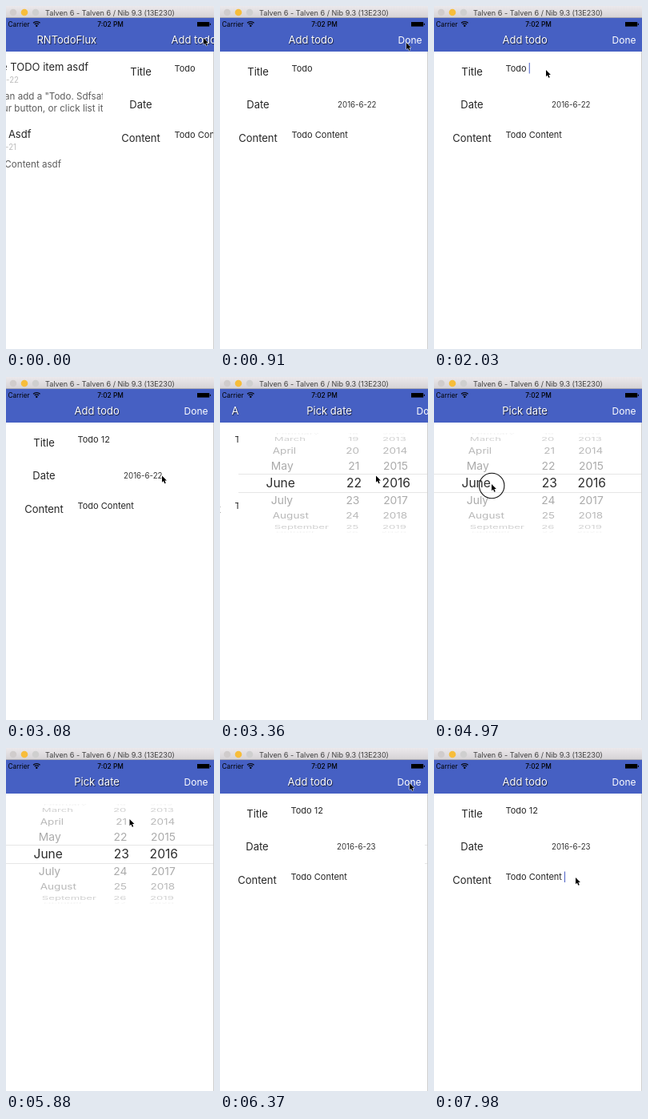
Write an HTML page with a canvas that moves like this. It is 260x429 px and loops after 8000 ms.

```html
<!DOCTYPE html>
<html lang="en">
<head>
<meta charset="utf-8">
<title>Todo app demo</title>
<style>
  html, body { margin: 0; width: 100%; height: 100%; overflow: hidden; background: #fff; }
  canvas { display: block; width: 260px; height: 429px; }
</style>
</head>
<body>
<canvas id="stage"></canvas>
<script>
const W = 260, H = 429, LOOP = 8000, TICK = 70, GLIDE = 280;
const BLUE = '#4660c3', INK = '#262626';
const canvas = document.getElementById('stage');
const ctx = canvas.getContext('2d');
const ratio = window.devicePixelRatio || 1;
canvas.width = W * ratio;
canvas.height = H * ratio;

// Where the pointer heads, when it leaves, and when it presses there
const STOPS = [
  { go: -GLIDE, x: 247, y: 40 },
  { go: 350, x: 233, y: 46 },
  { go: 1330, x: 140, y: 80, down: 1750, up: 1890 },
  { go: 2520, x: 195, y: 123.5, down: 2940, up: 3080 },
  { go: 3570, x: 181, y: 157 },
  { go: 3920, x: 154, y: 150, down: 4060, up: 4200 },
  { go: 4200, x: 154, y: 132, down: 4200, up: 4480 },
  { go: 4550, x: 72, y: 134, down: 4900, up: 5460 },
  { go: 5740, x: 237, y: 44, down: 6020, up: 6090 },
  { go: 7000, x: 165, y: 168, down: 7560, up: 7700 },
  { go: 7700, x: 177, y: 162 }
];

const clamp = (v, lo = 0, hi = 1) => Math.min(hi, Math.max(lo, v));

function ease(t, from, span = GLIDE) {
  const k = clamp((t - from) / span);
  return k * k * (3 - 2 * k);
}

// Critically damped spring, 0 to 1
function spring(ms) {
  const k = Math.max(0, ms) * 0.0145;
  return 1 - (1 + k) * Math.exp(-k);
}

function text(str, x, y, size, color = INK, align = 'left', weight = 400) {
  ctx.font = `${weight} ${size}px Inter, Arial, sans-serif`;
  ctx.textAlign = align;
  ctx.fillStyle = color;
  ctx.fillText(str, x, y);
}

function rect(x, y, w, h, color) {
  ctx.fillStyle = color;
  ctx.fillRect(x, y, w, h);
}

function circle(x, y, r, color, line) {
  ctx.beginPath();
  ctx.arc(x, y, r, 0, Math.PI * 2);
  ctx.fillStyle = ctx.strokeStyle = color;
  ctx.lineWidth = line;
  if (line) ctx.stroke();
  else ctx.fill();
}

function page(offset, title, titleX, action, body) {
  ctx.save();
  ctx.translate(Math.round(offset), 0);
  rect(0, 15, W, H - 15, '#fff');
  rect(0, 15, W, 42, BLUE);
  ctx.save();
  ctx.shadowColor = 'rgba(0,0,0,.75)';
  ctx.shadowOffsetX = ctx.shadowOffsetY = 0.8 * ratio;
  ctx.shadowBlur = ratio;
  text(title, titleX, 47.4, 13, '#fff');
  ctx.restore();
  text(action, 252.5, 47.4, 12, '#fff', 'right');
  body();
  ctx.restore();
}

function listBody() {
  const grey = '#bcbcbc', soft = '#5c5c5c';
  text('Some TODO item asdf', 145, 80.5, 13, INK, 'right');
  text('2016-6-22', 58, 96, 9.7, grey, 'right');
  text('You can add a "Todo. Sdfsaf', 165.5, 117, 11.6, soft, 'right');
  text('your button, or click list it', 163.5, 132, 11.7, soft, 'right');
  text('Todo Asdf', 73.5, 165, 13, INK, 'right');
  text('2016-6-21', 55, 180, 9.7, grey, 'right');
  text('Todo Content asdf', 111, 202, 11.6, soft, 'right');
}

function field(str, y, caret) {
  text(str, 89.5, y, 11);
  if (caret) rect(89.5 + ctx.measureText(str).width, y - 10.5, 1, 13.5, '#4a5fc4');
}

function formBody(t) {
  ['Title', 'Date', 'Content'].forEach((name, i) =>
    text(name, 47.5, 86.5 + i * 41.8, 13, INK, 'center'));
  const typed = clamp(Math.floor((t - 1890) / 140), 0, 3);
  field('Todo' + ' 12'.slice(0, typed), 81.5, t >= 1890 && t < 2660);
  text('2016-6-' + (t < 5000 ? 22 : 23), 171.3, 127, 9.7, '#333', 'center');
  field('Todo Content' + (t >= 7770 ? ' ' : ''), 165, t >= 7700);
}

// One wheel of the picker, drawn as rows around a cylinder
function wheel(pos, label, align, x, sideX, drift) {
  const step = 20.3 * Math.PI / 180;
  for (let i = Math.round(pos) - 4; i <= Math.round(pos) + 4; i++) {
    const d = i - pos, far = Math.abs(d), squash = Math.cos(d * step);
    if (squash < 0.1) continue;
    const main = far < 0.5;
    const size = main ? 15.6 : 14.2 - far * 0.35;
    const tone = main ? 45 : Math.min(250, 165 + 4.8 * far * far);
    ctx.save();
    ctx.translate(main ? x : sideX + drift * far, 132.7 + 62.6 * Math.sin(d * step));
    ctx.scale(1, squash);
    text(label(i), 0, size * 0.364, size, `rgb(${tone},${tone},${tone})`, align);
    ctx.restore();
  }
}

function monthName(i) {
  return new Date(2016, i - 1, 1).toLocaleString('en-US', { month: 'long' });
}

function pickerBody(t) {
  const nudge = 0.25 * Math.sin(Math.PI * clamp((t - 5110) / 350));
  wheel(6 + nudge, monthName, 'left', 34.5, 38.8, 2);
  wheel(22 + ease(t, 4200), String, 'right', 154, 151.9, -0.5);
  wheel(2016, String, 'center', 197.3, 197.3, -0.8);
  rect(0, 121, W, 1, '#e6e6e6');
  rect(0, 144, W, 1, '#e6e6e6');
}

function chrome() {
  const bar = ctx.createLinearGradient(0, 0, 0, 15);
  bar.addColorStop(0, '#ebe8eb');
  bar.addColorStop(1, '#d5d2d5');
  rect(0, 0, W, 15, bar);
  rect(0, 14, W, 1, '#a9a9b2');
  ['#d0cccc', '#f7bd3b', '#cfcfcf'].forEach((color, i) => circle(9 + i * 14, 8, 4.3, color));
  text('Talven 6 - Talven 6 / Nib 9.3 (13E230)', 130, 11.5, 9.1, '#404040', 'center');

  text('Carrier', 2.5, 25.7, 8.3, '#000');
  text('7:02 PM', 130.5, 25.7, 8.3, '#000', 'center', 500);
  ctx.strokeStyle = '#000';
  ctx.lineWidth = 1.2;
  for (const r of [3.6, 6]) {
    ctx.beginPath();
    ctx.arc(38.3, 25.5, r, -Math.PI * 0.75, -Math.PI * 0.25);
    ctx.stroke();
  }
  circle(38.3, 24.8, 1.2, '#000');
  rect(239, 20, 15.2, 5.6, '#000');
  rect(254.8, 21.8, 1.2, 2, '#000');
  rect(259, 57, 1, H - 57, '#cfcfcf');
}

function pointer(t) {
  let x = 0, y = 0;
  for (const stop of STOPS) {
    const k = ease(t, stop.go);
    x += (stop.x - x) * k;
    y += (stop.y - y) * k;
  }
  if (STOPS.some(s => t >= s.down && t < s.up)) circle(x + 0.2, y + 2, 15.7, '#111', 1.1);
  ctx.save();
  ctx.translate(x, y);
  ctx.scale(0.82, 0.82);
  const arrow = new Path2D('M0 0V10L2.3 8L4 12L5.8 11.2L4.1 7.3H7.2Z');
  ctx.lineJoin = 'round';
  ctx.lineWidth = 1.2;
  ctx.strokeStyle = '#fff';
  ctx.stroke(arrow);
  ctx.fillStyle = '#000';
  ctx.fill(arrow);
  ctx.restore();
}

function draw(ms) {
  // The picture rests before the first slide and near the end of the last
  let t = Math.floor((ms % LOOP) / TICK) * TICK;
  if (t < 140) t = 0;
  if (t >= 6370 && t < 6510) t = 6370;
  ctx.setTransform(ratio, 0, 0, ratio, 0, 0);
  ctx.clearRect(0, 0, W, H);

  const slide = 0.3 * W;
  const formIn = spring(t + 123.5);
  const pickIn = t < 5900 ? spring(t - 3080) : 1 - spring(t - 5950);
  if (formIn < 0.999) page(-slide * formIn, 'RNTodoFlux', 80.5, '', listBody);
  page(W * (1 - formIn) - slide * pickIn, 'Add todo', 85.5, 'Done', () => formBody(t));
  if (pickIn > 0.001) page(W * (1 - pickIn), 'Pick date', 85.2, 'Done', () => pickerBody(t));
  chrome();
  pointer(t);
}

const start = performance.now();
function loop() {
  draw(performance.now() - start);
  requestAnimationFrame(loop);
}
loop();
</script>
</body>
</html>
```
